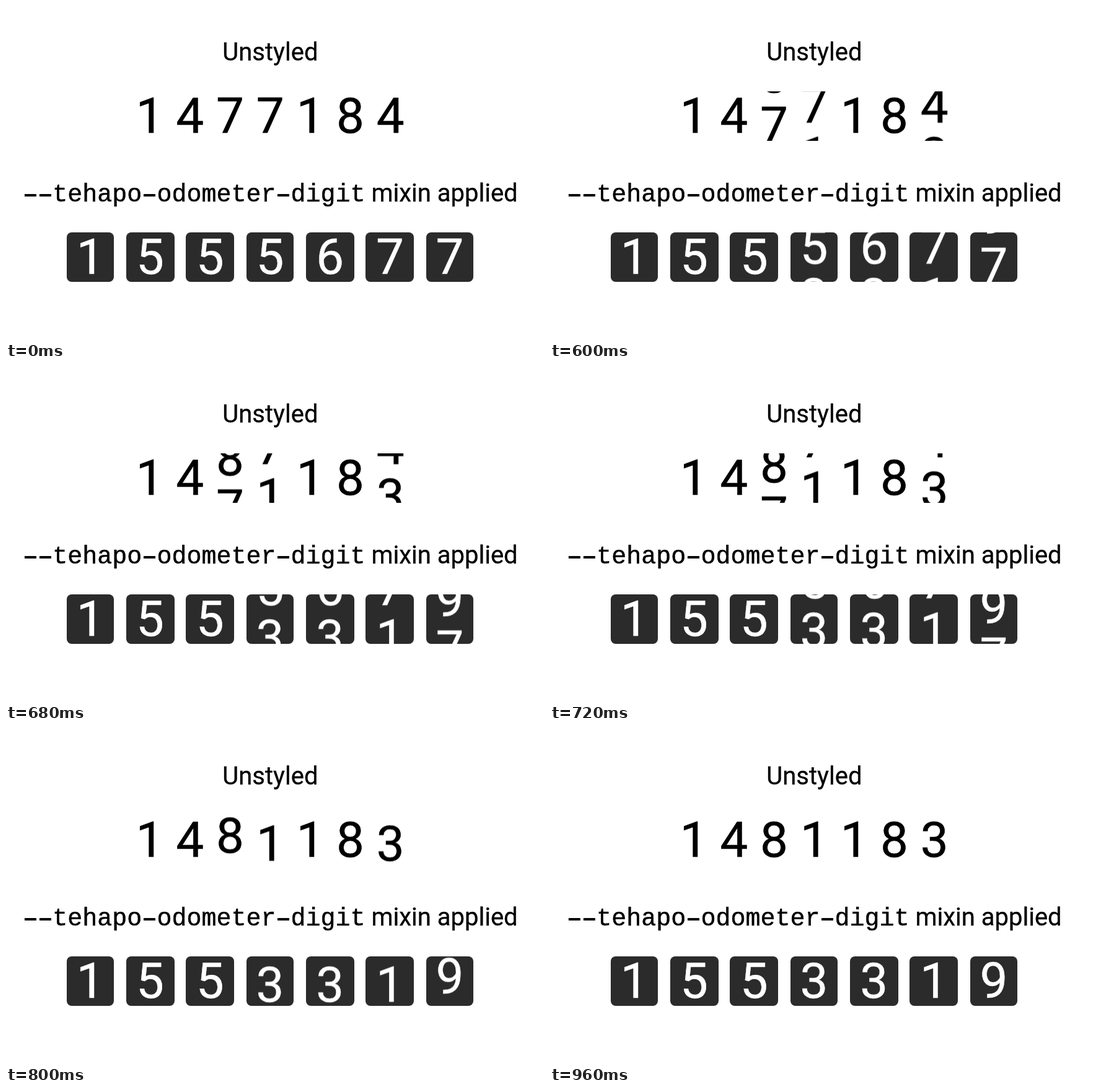
These frames come from a looping animation (868x540 px, 1.24 s). An HTML page:

```html
<!DOCTYPE html>
<html lang="en">
<head>
<meta charset="utf-8">
<title>Odometer</title>
<style>
  html, body { margin: 0; width: 100%; height: 100%; overflow: hidden; background: #fff; }
  body { position: relative; color: #000; font: 40px/48px Roboto, sans-serif; }

  .label { position: absolute; white-space: pre; -webkit-text-stroke: .3px; }
  .title { left: 349.3px; top: 51px; }
  .mixin { left: 27.3px; top: 279px; }
  code { font: 40px/48px "Liberation Mono", monospace; -webkit-text-stroke: .5px; }
  .dash {
    color: transparent;
    -webkit-text-stroke: 0;
    background: linear-gradient(#000, #000) 2.5px 50% / 19px 4px no-repeat;
  }

  .cell {
    position: absolute;
    height: 80px;
    overflow: hidden;
    font-size: 80px;
    line-height: 80px;
    -webkit-text-stroke: .5px;
  }
  .dark { background: #2b2b2b; color: #fff; border-radius: 8px; }
  .reel { position: absolute; top: 0; white-space: pre; }
</style>
</head>
<body>
<div class="label title">Unstyled</div>
<div class="label mixin"><code><span class="dash">-</span><span class="dash">-</span>tehapo<span class="dash">-</span>odometer<span class="dash">-</span>digit</code> mixin applied</div>
<script>
  const LOOP = 1240, TICK = 40, ROLL = 400, SIZE = 80;

  // CSS "ease": cubic-bezier(.25, .1, .25, 1)
  function ease(x) {
    const curve = (s, a, b) => 3 * s * (1 - s) * (a * (1 - s) + b * s) + s ** 3;
    let lo = 0, hi = 1;
    for (let i = 0; i < 30; i++) {
      const mid = (lo + hi) / 2;
      if (curve(mid, .25, .25) < x) lo = mid; else hi = mid;
    }
    return curve(lo, .1, 1);
  }

  // Samples the eased roll on every tick and holds each position.
  function rollSteps(start, from, to) {
    const steps = [];
    const add = (time, y) =>
      steps.push({ offset: time / LOOP, transform: `translateY(${y}px)`, easing: 'step-end' });
    add(0, from);
    for (let time = 560; time <= 960; time += TICK) {
      const progress = ease(Math.min(1, (time - start) / ROLL));
      add(time - .05, from + (to - from) * progress);
    }
    add(LOOP, to);
    return steps;
  }

  // Larger digits enter from above, smaller ones from below.
  function addCell(from, to, left, width, top, textLeft, style) {
    const cell = document.createElement('div');
    const reel = document.createElement('div');
    cell.className = 'cell ' + style;
    cell.style.cssText = `left:${left}px;top:${top}px;width:${width}px`;
    reel.className = 'reel';
    reel.style.left = textLeft - left + 'px';
    reel.textContent = from;
    cell.append(reel);
    document.body.append(cell);
    if (to === from) return;

    const down = to > from;
    reel.textContent = down ? to + '\n' + from : from + '\n' + to;
    const steps = down ? rollSteps(540, -SIZE, 0) : rollSteps(536, 0, -SIZE);
    reel.animate(steps, { duration: LOOP, iterations: Infinity });
  }

  function addRow(from, to, place) {
    [...from].forEach((digit, i) => addCell(digit, to[i], ...place(i)));
  }

  const boxes = [[98, 76], [194, 78], [290, 78], [388, 76], [484, 78], [580, 78], [678, 76]];

  addRow('1477184', '1481183', i => {
    const x = 209.6 + 64.7 * i;
    return [x, 45, 138, x, ''];
  });
  addRow('1555677', '1553319', i => [...boxes[i], 366, 113.4 + 96.7 * i, 'dark']);
</script>
</body>
</html>
```
